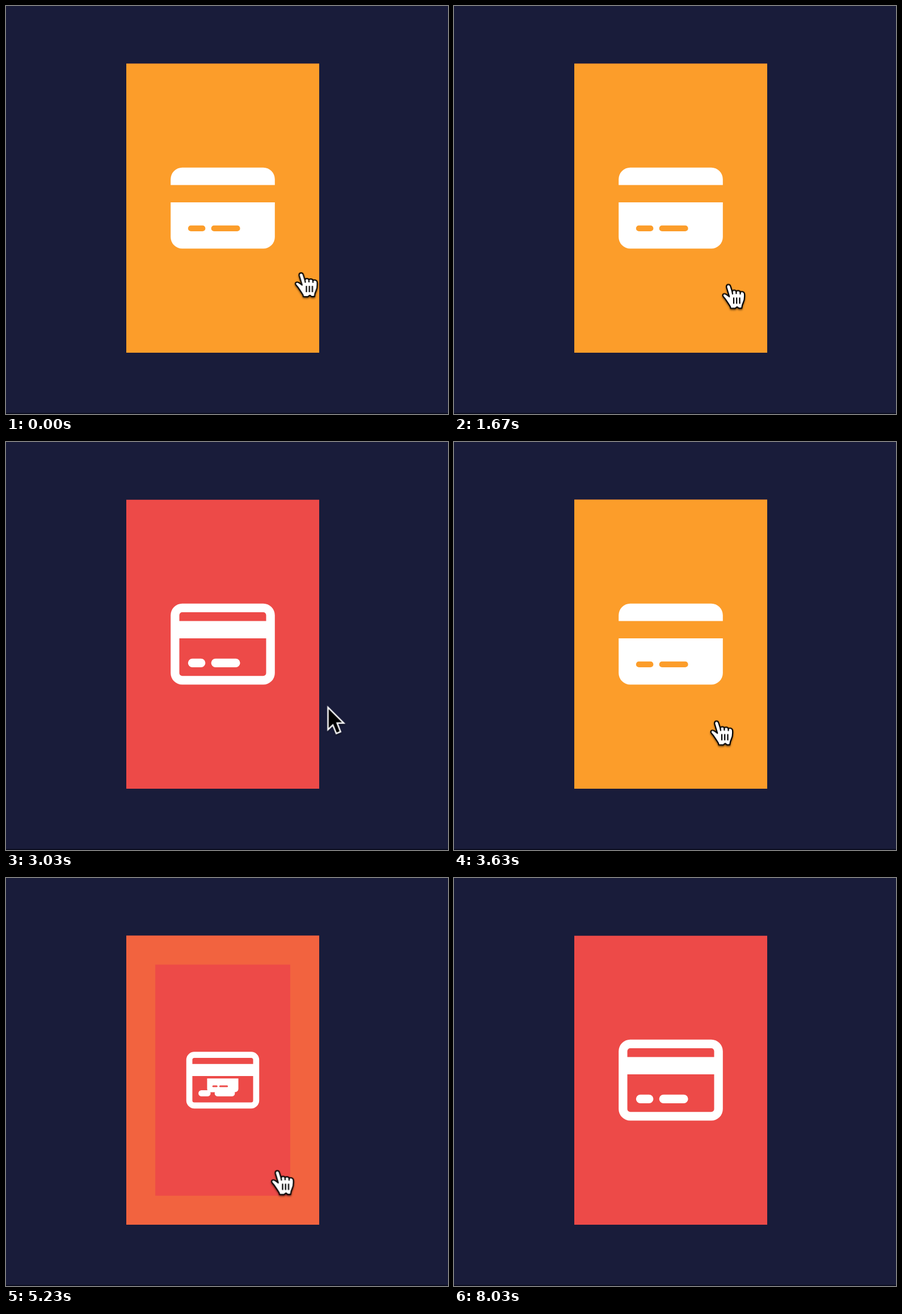
Animation of 779 by 719 pixels, one loop 9270 ms. Source, as an HTML page without scripts:

```html
<!DOCTYPE html>
<html lang="en">
<head>
<meta charset="utf-8">
<title>Card hover</title>
<style>
  /* --p: eased progress of the hover effect; --over: pointer is on the card */
  @property --p { syntax: "<number>"; inherits: true; initial-value: 1; }
  @property --over { syntax: "<number>"; inherits: true; initial-value: 1; }

  html, body { margin: 0; width: 100%; height: 100%; overflow: hidden; background: #191c3a; }

  .stage {
    --red: #ed4a48;
    --orange: #fc9d2a;
    --loop: 9270ms infinite;
    position: absolute; left: 0; top: 0;
    animation: hover var(--loop) ease, over var(--loop) step-end;
  }

  /* The frame grows inwards from the card's edge to half its width */
  .card {
    fill: var(--red);
    stroke: color-mix(in srgb, var(--orange) calc(var(--p) * 100%), var(--red));
    stroke-width: calc(var(--p) * 341px);
  }
  .icon { fill: #fff; fill-rule: evenodd; transform-box: fill-box; transform-origin: center; }
  .regular { transform: scale(calc(1 - var(--p))); }
  .solid { transform: scale(var(--p)); }

  .pointer { animation: move var(--loop) ease-in-out; }
  .hand { opacity: var(--over); filter: drop-shadow(0 2px 1.5px rgba(0, 0, 0, .55)); }
  .arrow { opacity: calc(1 - var(--over)); filter: drop-shadow(0 2px 1.5px rgba(0, 0, 0, .4)); }

  /* Each change takes half a second (5.4%) */
  @keyframes hover {
    0%, 2.8%, 17.4%, 23.2%, 38.7%, 44.4%, 60.73%, 71.34% { --p: 1; }
    8.2%, 12%, 28.6%, 33.3%, 49.8%, 55.34%, 76.73%, 100% { --p: 0; }
  }
  @keyframes over {
    0%, 12%, 33.3%, 55.34% { --over: 1; }
    2.8%, 23.2%, 44.4%, 71.34%, 100% { --over: 0; }
  }
  /* Resting places, in and out of the card by turns */
  @keyframes move {
    0%, .3% { transform: translate(520.5px, 470px); }
    6%, 10% { transform: translate(667px, 480px); }
    14%, 21.6% { transform: translate(484px, 490.5px); }
    25%, 30% { transform: translate(692px, 475px); }
    32.69% { transform: translate(566.5px, 465.5px); }
    36%, 43.1% { transform: translate(463px, 491.5px); }
    45.9%, 53.2% { transform: translate(663px, 505px); }
    56.42%, 69.8% { transform: translate(478.5px, 515.5px); }
    72.6%, 78.8% { transform: translate(660.5px, 502.5px); }
    80.6%, 100% { transform: translate(790px, 502px); }
  }
</style>
</head>
<body>
<svg class="stage" width="779" height="719" viewBox="0 0 779 719">
  <defs>
    <rect id="area" x="212" y="101.5" width="340" height="509.5"/>
    <clipPath id="edge"><use href="#area"/></clipPath>
  </defs>

  <rect y="717" width="779" height="2" fill="#0b0d20"/>
  <g clip-path="url(#edge)"><use class="card" href="#area"/></g>

  <g transform="translate(290.2 274.6) scale(.31875)">
    <path class="icon regular" d="
      M64 32H512a64 64 0 0 1 64 64V416a64 64 0 0 1-64 64H64a64 64 0 0 1-64-64V96a64 64 0 0 1 64-64z
      M64 80a16 16 0 0 0-16 16v32H528V96a16 16 0 0 0-16-16z
      M48 224V416a16 16 0 0 0 16 16H512a16 16 0 0 0 16-16V224z
      M120 336h48a24 24 0 0 1 0 48h-48a24 24 0 0 1 0-48z
      M248 336h112a24 24 0 0 1 0 48h-112a24 24 0 0 1 0-48z"/>
    <path class="icon solid" d="
      M64 32H512a64 64 0 0 1 64 64v32H0V96a64 64 0 0 1 64-64z
      M0 224H576V416a64 64 0 0 1-64 64H64a64 64 0 0 1-64-64z
      M112 352h64a16 16 0 0 1 0 32h-64a16 16 0 0 1 0-32z
      M240 352h128a16 16 0 0 1 0 32h-128a16 16 0 0 1 0-32z"/>
  </g>

  <g class="pointer">
    <path class="arrow" d="M2.2 5V38.5L10 31l6.3 15.5 5.2-2.2-6.2-15.8H25.7z"
          stroke="#fff" stroke-width="5" paint-order="stroke"/>
    <g class="hand">
      <g transform="translate(-11.5 -1.3)" fill="none" stroke="#000" stroke-width="2.2" stroke-linejoin="round">
        <path fill="#fff" d="M12.8 23L7.8 6.5C6.8.9 13.6 0 14.9 4.8L17.8 14C18.5 11 24 11 24.8 13.8
          C26 11.6 31.5 12 32 15C34 13.2 39 14 39.5 18C40 24 39.5 29 37.5 33C35.5 37 35 39 34.6 43.4
          H29.5C28.5 43 28 41.3 26.5 41.2C25 41.3 24 43.5 23 43.6L15 43.4C15 41 14 39.5 12.5 37.5
          L7.5 30C6 27 3 24.5 1.5 22C.2 19 3 17 6 18.2C9 19.5 11 21.5 12.8 23z"/>
        <path d="M17.8 14l.8 5M24.8 13.8l.2 4.5M32 15v4M20.5 24.5v11M25.7 24.5v11M31 24.5v11"/>
      </g>
    </g>
  </g>
</svg>
</body>
</html>
```
